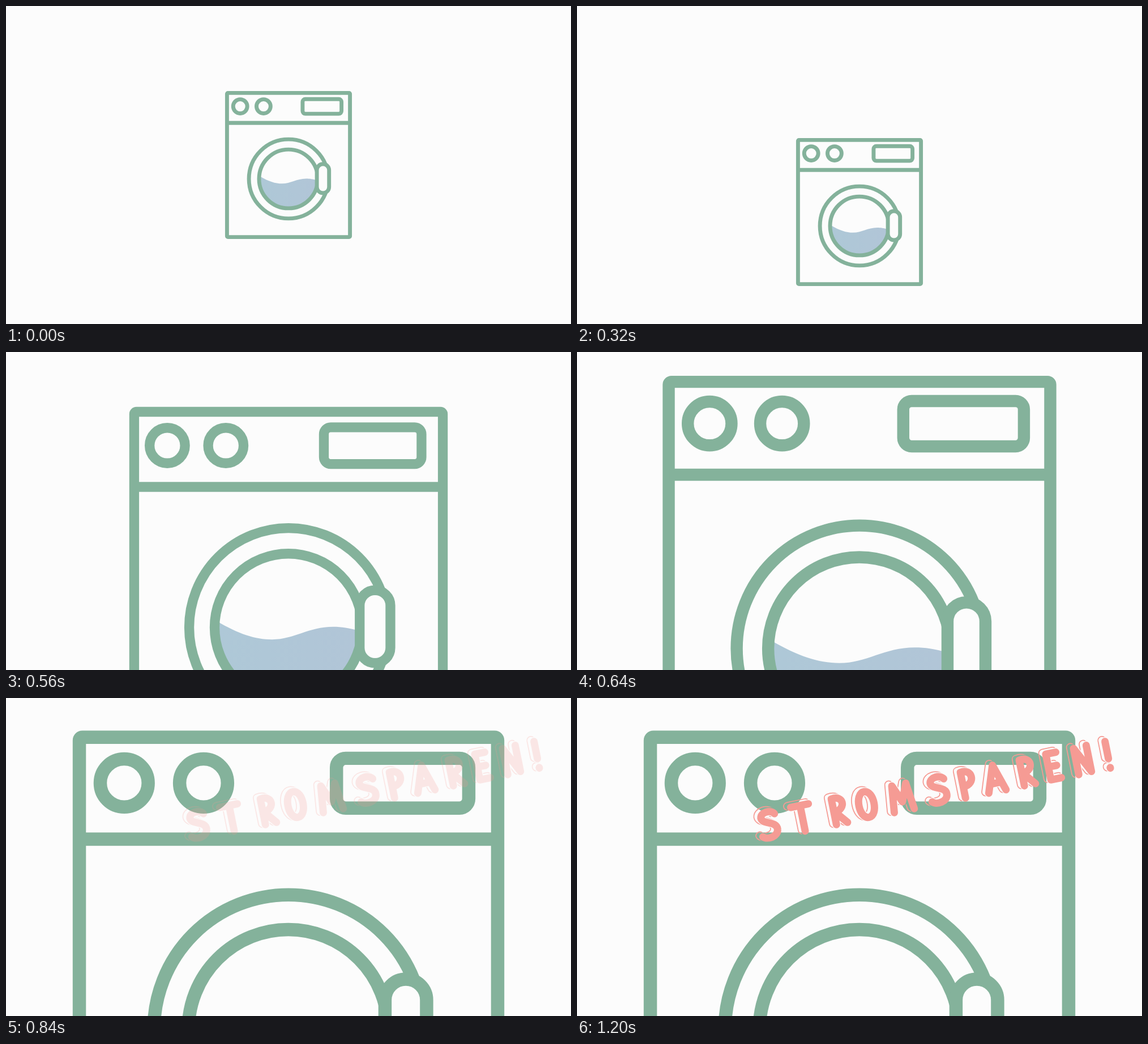
Write an HTML page with a canvas that moves like this. It is 998x561 px and loops after 1.32 s.

```html
<!DOCTYPE html>
<html lang="de">
<head>
<meta charset="utf-8">
<title>Stromsparen!</title>
<style>
html, body { margin: 0; width: 100%; height: 100%; overflow: hidden; background: #fcfcfc; }
canvas { display: block; }
</style>
</head>
<body>
<canvas id="stage" width="998" height="561" role="img" aria-label="STROMSPAREN!"></canvas>
<script>
const BG = '#fcfcfc', GREEN = '#84b29b', PINK = '#f59b94';
const LOOP = 1320, STEP = 40, LINE = 6.9;
const canvas = document.getElementById('stage');
const ctx = canvas.getContext('2d');

// Keyframes: [time, value], linear in between
const SCALE = [[320, 1], [480, 2.054], [560, 2.51], [640, 3.103], [680, 3.402]];
const CENTER_Y = [[0, 280.5], [320, 363.5], [480, 408], [560, 424.5], [640, 447], [680, 456], [760, 479.7], [840, 501.7]];
const WATER_SHIFT = [[0, 0], [320, 3.5], [480, 0.3], [640, 0], [760, -1.7]];
const TEXT_ALPHA = [[800, 0], [960, 0.86], [1080, 0.97], [1200, 1]];

function valueAt(keys, t) {
  if (t <= keys[0][0]) return keys[0][1];
  for (let i = 1; i < keys.length; i++) {
    const [t0, v0] = keys[i - 1], [t1, v1] = keys[i];
    if (t <= t1) return v0 + (v1 - v0) * (t - t0) / (t1 - t0);
  }
  return keys[keys.length - 1][1];
}

// Letter skeletons around their own centre
const GLYPHS = {
  S: 'M13-17C8-26-11-24-12-14C-12-2 15-4 13 11C12 24-8 26-15 19',
  T: 'M-16-22H16M1-22V24',
  R: 'M-9 24V-22C14-26 14 0-7 2L11 24',
  O: 'M0-23C-18-23-18 23 0 23C18 23 18-23 0-23Z',
  M: 'M-18 24L-13-23L0 8L12-23L18 24',
  P: 'M-8 24V-22C14-26 16 3-7 4',
  A: 'M-16 24L0-23L15 24M-9 9H9',
  E: 'M10-23H-8V23H11M-8 0H7',
  N: 'M-12 24V-23L11 23V-24',
  '!': 'M0-24V7M0 23V24'
};
const WORD = 'STROMSPAREN!';
const LETTER_X = [336, 394, 459, 508, 570, 635, 686, 735, 791, 837, 890, 934];

function makeLettering() {
  const layer = document.createElement('canvas');
  layer.width = canvas.width;
  layer.height = canvas.height;
  const c = layer.getContext('2d');
  c.lineCap = c.lineJoin = 'round';
  c.strokeStyle = PINK;
  [...WORD].forEach((letter, i) => {
    const path = new Path2D(GLYPHS[letter]);
    const x = LETTER_X[i];
    const pass = (width, dx, dy, erase) => {
      c.save();
      c.translate(x, 222 - (x - 336) * 0.206);
      c.rotate(-0.2);
      c.translate(3 + dx, 2 + dy);
      c.globalCompositeOperation = erase ? 'destination-out' : 'source-over';
      c.lineWidth = width;
      c.stroke(path);
      c.restore();
    };
    // thin contour up-left, then the solid face with a gap around it
    pass(15.5, -5, -3, false);
    pass(12, -5, -3, true);
    pass(15.5, 0, 0, true);
    pass(13, 0, 0, false);
  });
  return layer;
}
const lettering = makeLettering();

function box(x0, y0, x1, y1, r) {
  ctx.beginPath();
  ctx.roundRect(x0, y0, x1 - x0, y1 - y0, r);
}

function ring(x, y, r) {
  ctx.beginPath();
  ctx.arc(x, y, r, 0, Math.PI * 2);
  ctx.stroke();
}

function drawWater(shift) {
  ctx.save();
  ctx.translate(0, 155);
  ctx.beginPath();
  ctx.arc(0, 0, 50, 0, Math.PI * 2);
  ctx.clip();
  ctx.translate(0, shift);
  const tint = ctx.createLinearGradient(-48, 0, 48, 0);
  tint.addColorStop(0, '#aec8d7');
  tint.addColorStop(1, '#b1c5d7');
  ctx.fillStyle = tint;
  ctx.fill(new Path2D('M-52-5.5C-36 4-24 8.3-11.5 8.3C4 8.3 14-.6 31.5-.6C38-.6 43 .3 52 2.8V60H-52Z'));
  ctx.restore();
}

// Machine coordinates: x from its middle, y from its top edge
function drawMachine(t) {
  const scale = valueAt(SCALE, t);
  ctx.save();
  ctx.translate(499, valueAt(CENTER_Y, t) - 130.5 * scale);
  ctx.scale(scale, scale);
  ctx.strokeStyle = GREEN;
  ctx.lineWidth = LINE;

  box(-108.6, 3.4, 108.6, 257.6, 1.6);
  ctx.stroke();
  ctx.beginPath();
  ctx.moveTo(-108, 56.2);
  ctx.lineTo(108, 56.2);
  ctx.stroke();
  ring(-85.3, 27.1, 12.45);
  ring(-44.1, 27.1, 12.45);
  box(24.9, 14.3, 93.6, 40.1, 4.8);
  ctx.stroke();

  drawWater(valueAt(WATER_SHIFT, t));
  ring(0, 155, 69.9);
  ring(-0.1, 155, 51.9);
  box(50.1, 128.8, 71.7, 180, 10.8);
  ctx.fillStyle = BG;
  ctx.fill();
  ctx.stroke();
  ctx.restore();
}

function render(now) {
  const t = Math.floor(now % LOOP / STEP) * STEP;
  ctx.fillStyle = BG;
  ctx.fillRect(0, 0, canvas.width, canvas.height);
  drawMachine(t);
  ctx.globalAlpha = valueAt(TEXT_ALPHA, t);
  ctx.drawImage(lettering, 0, 0);
  ctx.globalAlpha = 1;
}

let start;
function tick(now) {
  start ??= now;
  render(now - start);
  requestAnimationFrame(tick);
}
render(0);
requestAnimationFrame(tick);
</script>
</body>
</html>
```
